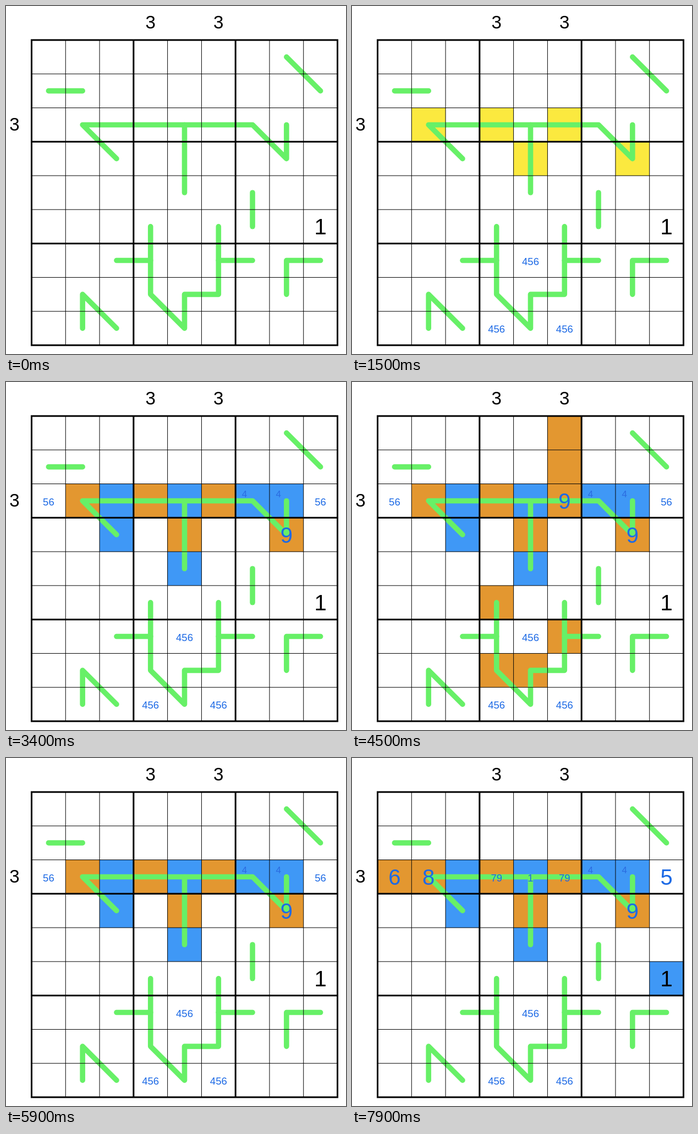
Animation, 618 px wide and 634 px high, one loop 8 s. Source, as an HTML page:

```html
<!DOCTYPE html>
<html lang="en">
<head>
<meta charset="utf-8">
<title>Sudoku</title>
<style>
  html, body { margin: 0; width: 100%; height: 100%; overflow: hidden; background: #fff; }
  svg { display: block; width: 100%; height: 100%; }
  text { font-family: "Liberation Sans", Arial, sans-serif; text-anchor: middle; fill: #1d6ae5; }
  .big { font-size: 40px; }
  .mid { font-size: 18.5px; }
  .corner { font-size: 17px; fill: #2b6be0; }
  .given { font-size: 40px; fill: #000; }
  .clue { font-size: 33px; fill: #000; }
</style>
</head>
<body>
<svg id="stage" viewBox="0 0 618 634"></svg>
<script>
const LOOP = 8000, X0 = 46.5, Y0 = 62, SIZE = 61.78;
const YELLOW = '#fbe93f', RED = '#f53a37', BLUE = '#3f98f6', ORANGE = '#e39730', NONE = 'none';
const stage = document.getElementById('stage');

function add(tag, attrs, text) {
  const node = document.createElementNS('http://www.w3.org/2000/svg', tag);
  for (const k in attrs) node.setAttribute(k, attrs[k]);
  if (text) node.textContent = text;
  return stage.appendChild(node);
}
const cx = c => X0 + (c + 0.5) * SIZE;
const cy = r => Y0 + (r + 0.5) * SIZE;
const label = (cls, x, y, text) => add('text', { class: cls, x, y }, text);

// Cells are keyed by column and row digits, e.g. "36".
const cells = {};
function eachCell(fn) {
  for (let r = 0; r < 9; r++) for (let c = 0; c < 9; c++) fn(c, r, '' + c + r);
}

eachCell((c, r, key) => {
  cells[key] = {
    fill: add('rect', { x: X0 + c * SIZE, y: Y0 + r * SIZE, width: SIZE, height: SIZE, fill: NONE })
  };
});

const strokes = ['70 81', '01 11', '23 12 62 73 72', '42 44', '64 65',
  '35 37 48 47 57 55', '26 36', '56 66', '86 76 77', '18 17 28'];
for (const s of strokes) {
  add('polyline', {
    points: s.split(' ').map(p => cx(+p[0]) + ',' + cy(+p[1])).join(' '),
    fill: NONE, stroke: '#67f067', 'stroke-width': 9.6,
    'stroke-linecap': 'round', 'stroke-linejoin': 'round'
  });
}

function gridLines(pick, width) {
  let d = '';
  for (let i = 0; i <= 9; i++) {
    if (!pick(i)) continue;
    d += `M${X0 + i * SIZE} ${Y0}v${9 * SIZE}M${X0} ${Y0 + i * SIZE}h${9 * SIZE}`;
  }
  add('path', { d, fill: NONE, stroke: '#000', 'stroke-width': width, 'stroke-linecap': 'square' });
}
gridLines(i => i % 3, 1);
gridLines(i => i % 3 === 0, 3);

label('clue', cx(3), 41, '3');
label('clue', cx(5), 41, '3');
label('clue', 15.5, 227, '3');
label('given', cx(8), cy(5) + 14.3, '1');

eachCell((c, r, key) => {
  const cell = cells[key];
  cell.big = label('big', cx(c), cy(r) + 14.3);
  cell.mid = label('mid', cx(c), cy(r) + 8.3);
  cell.corner = label('corner', cx(c) - 14.6, cy(r) - 6.3);
});

// [time, property, cells, value]
const moves = [
  [200, 'fill', '35', YELLOW],
  [300, 'fill', '36', RED], [300, 'fill', '26', YELLOW],
  [400, 'fill', '37', YELLOW], [400, 'fill', '48', RED],
  [500, 'fill', '47', YELLOW], [500, 'fill', '57', RED],
  [600, 'fill', '56', YELLOW],
  [700, 'fill', '55 66', RED],
  [800, 'mid', '46', '456'],
  [900, 'mid', '38 58', '456'],

  [1300, 'fill', '35 36 26 37 48 47 57 56 55 66', NONE],
  [1400, 'fill', '12 32 52', YELLOW],
  [1500, 'fill', '43 73', YELLOW],
  [1600, 'fill', '22 42 62 72', BLUE],
  [1700, 'fill', '23 44', BLUE],

  [2100, 'fill', '12 32 52 43 73', ORANGE],
  [2200, 'corner', '62 72', '4'],
  [2300, 'big', '73', '9'],
  [2400, 'mid', '02 82', '56'],

  [3000, 'big', '12', '9'],
  [3200, 'big', '02', '6'],
  [3400, 'big', '02 12', ''],
  [3700, 'big', '52', '9'],
  [4000, 'fill', '50 51', ORANGE],
  [4100, 'fill', '56', ORANGE],
  [4300, 'fill', '35', ORANGE],
  [4400, 'fill', '37', ORANGE],
  [4500, 'fill', '47', ORANGE],
  [4700, 'fill', '35 37 47 56', NONE],
  [4900, 'big', '32', '8'],
  [5100, 'big', '32', '7'],
  [5300, 'big', '02', '6'],

  [5600, 'fill', '50 51', NONE],
  [5700, 'big', '52', ''],
  [5800, 'big', '32', ''],
  [5900, 'big', '02', ''],
  [6100, 'big', '02', '6'],
  [6200, 'big', '82', '5'],
  [6300, 'fill', '85', BLUE],
  [6400, 'fill', '02', ORANGE],
  [6600, 'mid', '12', '78'],

  [6900, 'big', '12', '7'],
  [7000, 'big', '32', '9'],
  [7200, 'fill', '30 31', ORANGE], [7200, 'big', '52', '8'],
  [7700, 'fill', '30 31', NONE], [7700, 'big', '32 52', ''],
  [7800, 'big', '12', '8'], [7800, 'mid', '32 52', '79'],
  [7900, 'mid', '42', '1']
];

function draw(t) {
  const state = {};
  for (const key in cells) state[key] = { fill: NONE, big: '', mid: '', corner: '' };
  for (const [at, prop, keys, value] of moves) {
    if (at <= t) for (const key of keys.split(' ')) state[key][prop] = value;
  }
  for (const key in cells) {
    const cell = cells[key], s = state[key];
    cell.fill.setAttribute('fill', s.fill);
    cell.big.textContent = s.big;
    cell.mid.textContent = s.big ? '' : s.mid;
    cell.corner.textContent = s.big ? '' : s.corner;
  }
}

const start = performance.now();
function tick() {
  draw((performance.now() - start) % LOOP);
  requestAnimationFrame(tick);
}
tick();
</script>
</body>
</html>
```
